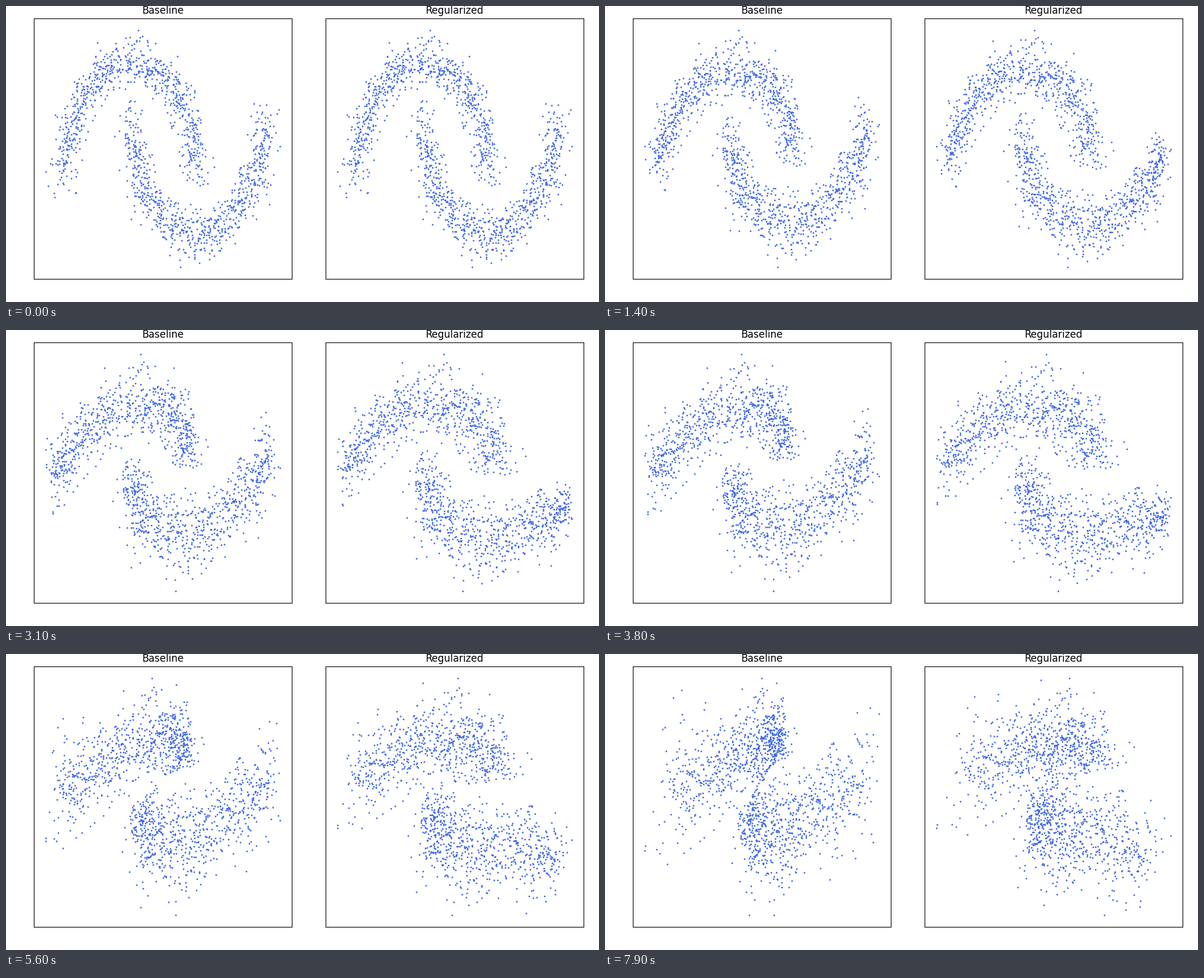
Recreate the animation shown at these times as a matplotlib script. Size 1000x500 px, loop 8 s.

```python
import numpy as np
import matplotlib.pyplot as plt
from matplotlib.animation import FuncAnimation

W, H, DPI = 1000, 500, 100
FRAMES, STEP = 80, 100
BOX_W, BOX_H = 435, 440
LEFTS, TOP = (47.1, 539.1), 21.1
N = 740                      # random points per moon

# Each moon is a ribbon: s runs along the arc (0 to 1), rho across it.
# Final spine points and cross vectors (per 0.1 of rho) at s = 0, 1/3, 2/3, 1.
ENDS = {
    "Baseline": {
        "upper": ([(110, 220), (212, 178), (274, 141), (301, 171)],
                  [(8, -55), (6, -42), (6, -34), (10, -9)]),
        "lower": ([(238, 268), (277, 298), (344, 268), (445, 190)],
                  [(-10, 22), (-3, 42), (-1, 39), (0, 50)]),
    },
    "Regularized": {
        "upper": ([(97, 200), (217, 150), (292, 140), (359, 185)],
                  [(8, -46), (6, -41), (17, -32), (23, -8)]),
        "lower": ([(232, 245), (261, 298), (336, 305), (448, 335)],
                  [(-15, 18), (-12, 35), (-6, 40), (-11, 35)]),
    },
}

# Centre, direction of the bulge, and the outermost points as (s, rho).
MOONS = {
    "upper": ((209.5, 287), -1, [(0.53, 0.27), (0.37, 0.26), (0.01, 0.28),
                                 (-0.05, 0.16), (0.98, 0.265), (0.69, 0.255)]),
    "lower": ((321.5, 190), 1, [(0.44, 0.31), (0.94, 0.28), (1.02, 0.24),
                                (0.81, 0.32), (1.02, -0.09), (0.23, 0.32)]),
}

rng = np.random.default_rng(8)


def scatter(strays):
    s = np.linspace(0, 1, N) + rng.normal(0, 0.1 / np.pi, N).clip(-0.06, 0.06)
    rho = rng.normal(0, 0.1, N).clip(-0.25, 0.25)
    return np.vstack([np.column_stack([s, rho]), strays]).T


def along(points, s):
    """Cubic curve through four evenly spaced points."""
    coef = np.polyfit(np.linspace(0, 1, 4), points, 3)
    return np.column_stack([np.polyval(c, s) for c in coef.T])


def place(name, ends, s, rho, t):
    """Positions of one moon at time t from 0 to 1."""
    center, side, _ = MOONS[name]
    ray = np.column_stack([-112 * np.cos(np.pi * s),
                           side * 195 * np.sin(np.pi * s)])
    start = center + ray
    spine, cross = (along(p, s) for p in ends)
    ease = np.array([t ** 1.2, 1 - (1 - t) ** 1.8])
    mid = start + (spine - start) * ease
    return mid + rho[:, None] * (ray + (10 * cross - ray) * t)


def fit(p):
    """Scale to the box with a margin of 5 percent of the data range."""
    lo, hi = p.min(0), p.max(0)
    return ((p - lo) / (hi - lo) + 0.05) / 1.1


cloud = {name: scatter(moon[2]) for name, moon in MOONS.items()}

plt.rcParams["font.family"] = "DejaVu Sans"
fig = plt.figure(figsize=(W / DPI, H / DPI), dpi=DPI, facecolor="white")
dots = {}
for left, title in zip(LEFTS, ENDS):
    ax = fig.add_axes([left / W, 1 - (TOP + BOX_H) / H, BOX_W / W, BOX_H / H])
    ax.set(xlim=(0, 1), ylim=(1, 0), xticks=[], yticks=[])
    ax.set_title(title, fontsize=12)
    dots[title], = ax.plot([], [], ".", ms=2, color="royalblue")


def draw(frame):
    t = frame / (FRAMES - 1)
    for title, dot in dots.items():
        pts = [place(name, ENDS[title][name], *cloud[name], t) for name in MOONS]
        dot.set_data(*fit(np.vstack(pts)).T)
    return list(dots.values())


anim = FuncAnimation(fig, draw, frames=FRAMES, interval=STEP, repeat=True,
                     repeat_delay=0, blit=False)
plt.show()
```
